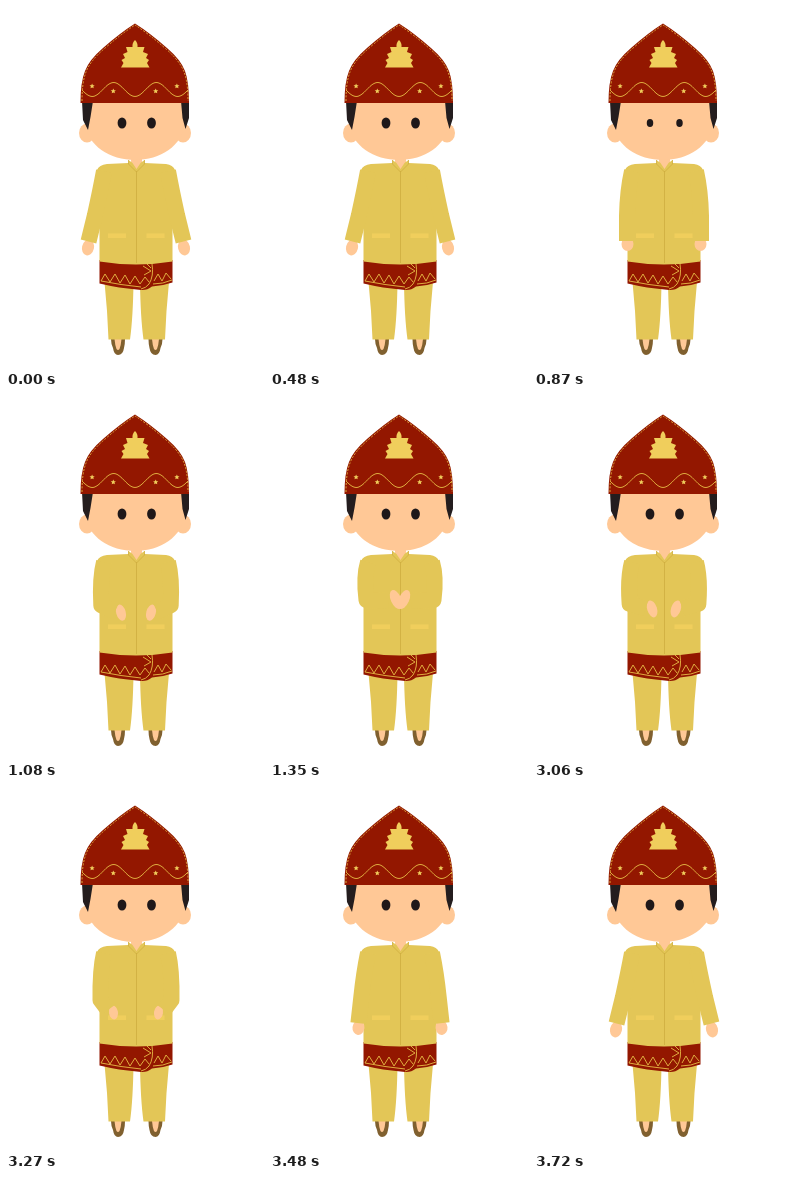
Recreate the animation shown at these times as an HTML page. Size 258 by 363 pixels, loop 3750 ms.

```html
<!DOCTYPE html>
<html lang="en">
<head>
<meta charset="utf-8">
<title>Greeting</title>
<style>
html, body { margin: 0; width: 100%; height: 100%; overflow: hidden; background: #fff; }
svg { display: block; width: 100vw; height: 100vh; }
.skin { fill: #ffc896; }
.cloth { fill: #e3c657; }
.red { fill: #931700; }
.gold { fill: #f0ce5c; }
.trim { fill: none; stroke: #dfac3f; stroke-width: 1; }
.seam { fill: none; stroke: #cfae3f; stroke-width: .8; }
.sleeve { fill: none; stroke: #e3c657; stroke-width: 16; stroke-linejoin: round; }
</style>
</head>
<body>
<svg viewBox="0 0 258 363">
  <defs>
    <g id="leg">
      <path class="skin" d="M107 331H118L116 345H109Z"/>
      <path fill="#80602f" d="M105 333H108.500Q109 339 110.500 343Q112 345 113.500 343Q115 339 115.500 333H119Q119 338 118 342Q117 349 112 349Q108 349 107 342Q105 338 105 333Z"/>
      <path class="cloth" d="M98.500 276H127.500Q127 312 124 333.500H102.500Q101.500 305 98.500 276Z"/>
    </g>
    <path id="star" class="gold" d="M0-2.600L.8-.8L2.600-.7L1.200.6L1.600 2.300L0 1.400L-1.600 2.300L-1.200.6L-2.600-.7L-.8-.8Z"/>
    <path id="pocket" class="gold" d="M102 227.500H120V232H102Z"/>
  </defs>

  <use href="#leg"/>
  <use href="#leg" transform="translate(261.500 0) scale(-1 1)"/>

  <path class="red" d="M93.500 254H166.500V276.500Q156 280 146 280.500Q141 284.500 135 284Q112 282 93.500 277.500Z"/>
  <path class="trim" d="M146 258Q148 270 143 278Q140 282 135 283M95 275Q115 279 135 281M147 278Q157 278 166 274"/>
  <path class="trim" d="M95 275L99 268L104 276L109 268L114 277L119 269L124 278L129 270L134 278L139 271L143 276M148 275L152 268L156 275L160 267L165 273"/>
  <path class="trim" d="M137 260L145 265L138 269M141 258L145 262"/>

  <path class="skin" d="M125 150H136V159L130.500 165L125 159Z"/>
  <path class="cloth" d="M122.500 154L126.500 157L130.500 163L134.500 157L138.500 154V157L160 158Q167 159 169 164L166.500 205V255.500Q130 261.500 93.500 255.500V205L91 164Q93 159 101 158L122.500 157Z"/>
  <path class="seam" d="M122.500 154V158L130.500 166L138.500 158V154M130.500 165V257"/>
  <use href="#pocket"/>
  <use href="#pocket" transform="translate(260.500 0) scale(-1 1)"/>

  <g class="arm"><ellipse class="skin"/><path class="sleeve"/></g>
  <g class="arm" transform="translate(260 0) scale(-1 1)"><ellipse class="skin"/><path class="sleeve"/></g>

  <g class="skin">
    <ellipse cx="81" cy="127" rx="8" ry="9.500"/>
    <ellipse cx="177" cy="127" rx="8" ry="9.500"/>
    <path d="M79 92H179V116C177 140 154 154 129 154C104 154 81 140 79 116Z"/>
  </g>
  <path fill="#241d1e" d="M76 95H87L84.500 111L82 124L77 114ZM175 95H183V112L179.500 123L176.500 112Z"/>
  <g fill="#1f1819">
    <ellipse class="eye" cx="116" cy="117"/>
    <ellipse class="eye" cx="145.500" cy="117"/>
  </g>

  <path class="red" d="M129 17.500Q144 27 161 42Q175 54 179 65Q183 76 183 97H74.500Q74.500 76 79 65Q83 54 97 42Q114 27 129 17.500Z"/>
  <path class="trim" stroke-dasharray="2 1.500" d="M76 95Q76 76 80 66Q84 55 98 43Q115 28 129 19Q143 28 160 43Q174 55 178 66Q182 76 182 95"/>
  <path class="trim" id="wave"/>
  <g id="stars"></g>
  <path class="gold" d="M129 34Q132 37 131.500 41L138.500 41L137 46L142 48L140 52L143 54L141 57L143.500 61.500H115L117.500 57L115.500 54L119 52L117 48L121.500 46L120 41L126.500 41Q126 37 129 34Z"/>
</svg>
<script>
const LOOP = 3750, STEP = 30;
const all = q => [...document.querySelectorAll(q)];
const arms = all('.arm'), eyes = all('.eye');

// shoulder, upper arm, elbow, wrist, then hand: x, y, rx, ry, angle
const DOWN  = [98, 165, 94.5, 184, 89, 209, 82.5, 235.5, 82, 241.5, 6, 8, 13];
const SIDE  = [98, 165, 93.5, 185, 93, 210, 93, 235, 93.5, 238, 6, 7, 0];
const FRONT = [98, 165, 94, 182, 94.5, 212, 102, 222, 107.5, 224.5, 4.5, 7, -8];
const CLASP = [98, 165, 93.5, 180, 96.5, 203, 119, 204, 126, 202.5, 5.2, 10, -24];

const linear = u => u;
const easeIn = u => u ** 1.6;
const easeOut = u => 1 - (1 - u) ** 1.8;

const KEYS = [
  [0, DOWN], [480, DOWN, linear], [870, SIDE, easeIn], [990, FRONT, linear],
  [1350, CLASP, easeOut], [2760, CLASP, linear], [3270, FRONT, easeIn],
  [3390, SIDE, linear], [3720, DOWN, easeOut], [LOOP, DOWN, linear]
];

function poseAt(t) {
  const i = KEYS.findIndex((k, n) => n && t <= k[0]);
  const [t0, a] = KEYS[i - 1], [t1, b, ease] = KEYS[i];
  const u = ease((t - t0) / (t1 - t0));
  return a.map((v, n) => v + (b[n] - v) * u);
}

// 0 = open, 1 = shut
const blinkAt = (t, mid) => Math.max(0, 1 - Math.abs(t - mid) / 85);

function draw(t) {
  const [sx, sy, mx, my, ex, ey, wx, wy, hx, hy, rx, ry, turn] = poseAt(t);
  for (const arm of arms) {
    const [hand, sleeve] = arm.children;
    sleeve.setAttribute('d', `M${sx} ${sy}Q${mx} ${my} ${ex} ${ey}L${wx} ${wy}`);
    hand.setAttribute('rx', rx);
    hand.setAttribute('ry', ry);
    hand.setAttribute('transform', `translate(${hx} ${hy}) rotate(${turn})`);
  }
  const open = 1 - 0.9 * Math.max(blinkAt(t, 930), blinkAt(t, 2850));
  for (const eye of eyes) {
    eye.setAttribute('rx', 4.4 * open);
    eye.setAttribute('ry', 5.5 * open);
  }
}

function trimHat() {
  let d = '', stars = '';
  for (let x = 76; x <= 182; x += 2)
    d += `${d ? 'L' : 'M'}${x} ${(83.5 + 7 * Math.cos((x - 129) * Math.PI / 21.4)).toFixed(1)}`;
  for (const i of [-2, -1, 1, 2])
    stars += `<use href="#star" x="${128.5 + i * 21.2}" y="${i % 2 ? 85 : 80}"/>`;
  document.getElementById('wave').setAttribute('d', d);
  document.getElementById('stars').innerHTML = stars;
}

trimHat();
const start = performance.now();
function tick() {
  const t = (performance.now() - start) % LOOP;
  draw(Math.floor(t / STEP) * STEP);
  requestAnimationFrame(tick);
}
tick();
</script>
</body>
</html>
```
